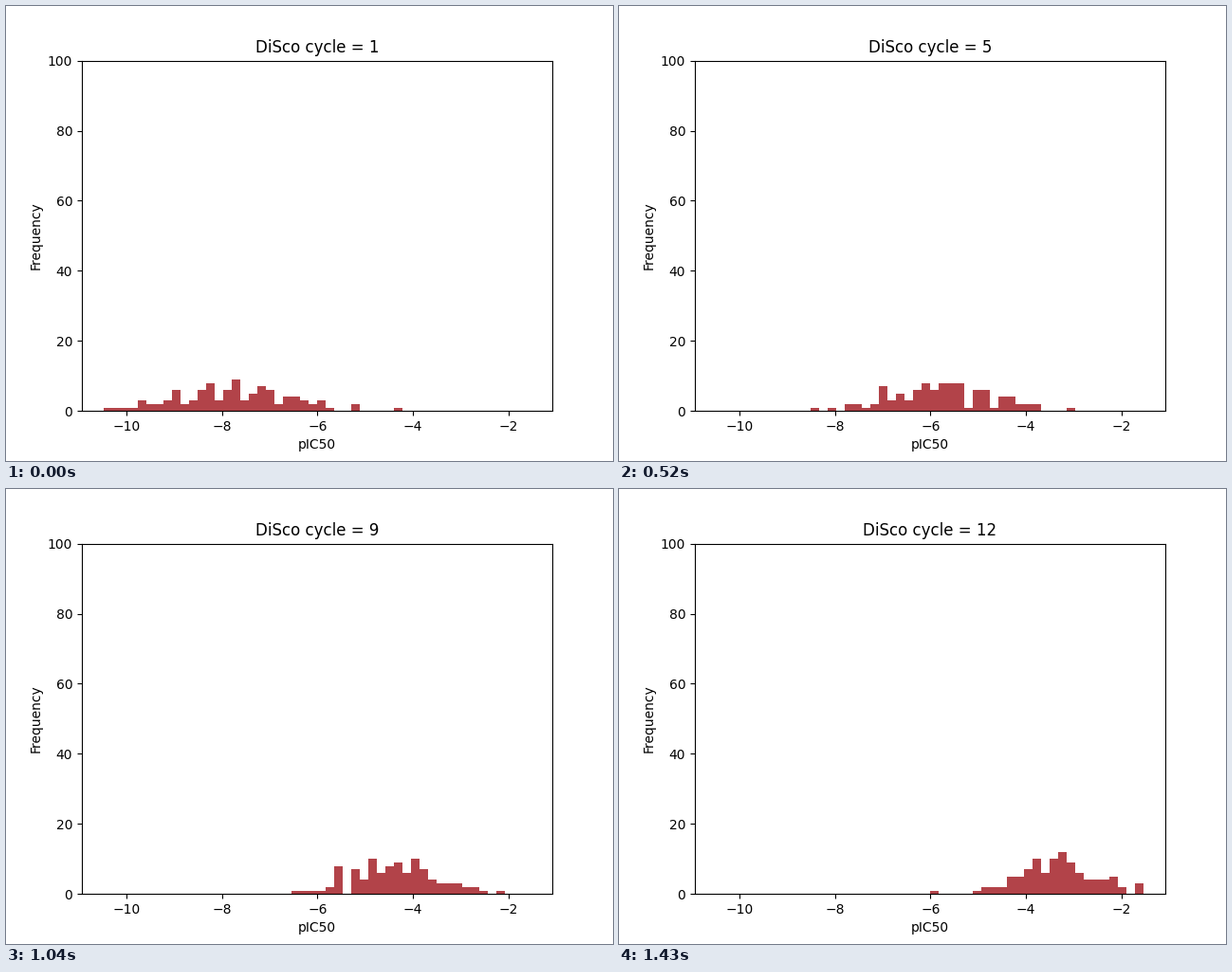
Recreate the animation shown at these times as a matplotlib script. Size 640 px wide and 480 px high, loop 1.56 s.

```python
import numpy as np
import matplotlib.pyplot as plt
from matplotlib.animation import FuncAnimation

BINS = 50
CYCLES = 12
SAMPLES = 100
LOW, HIGH = -10.487, -1.532
BAR_COLOR = "#b24349"

edges = np.linspace(LOW, HIGH, BINS + 1)


def normal_quantile(u):
    """Tukey lambda approximation of the inverse normal distribution."""
    return (u ** 0.14 - (1 - u) ** 0.14) / 0.1975


def histogram(cycle):
    """Bell-shaped sample whose centre climbs and narrows with each cycle."""
    rng = np.random.default_rng(cycle)
    center = np.interp(cycle, [1, 3, 7, CYCLES], [-7.75, -6.5, -5.08, -3.35])
    spread = np.interp(cycle, [1, CYCLES], [1.15, 0.75])
    u = (np.arange(SAMPLES) + rng.random(SAMPLES)) / SAMPLES
    jitter = rng.normal(0, 0.15, SAMPLES)
    values = center + spread * normal_quantile(u) + jitter
    return np.histogram(np.clip(values, LOW, HIGH), edges)[0]


fig, ax = plt.subplots(figsize=(6.4, 4.8), dpi=100)
bars = ax.bar(edges[:-1], np.zeros(BINS), width=np.diff(edges),
              align="edge", color=BAR_COLOR)
margin = 0.05 * (HIGH - LOW)
ax.set_xlim(LOW - margin, HIGH + margin)
ax.set_ylim(0, 100)
ax.set_xlabel("pIC50")
ax.set_ylabel("Frequency")
title = ax.set_title("")


def update(frame):
    cycle = frame + 1
    for bar, count in zip(bars, histogram(cycle)):
        bar.set_height(count)
    title.set_text(f"DiSco cycle = {cycle}")
    return [*bars, title]


animation = FuncAnimation(fig, update, frames=CYCLES, interval=130,
                          repeat=True, repeat_delay=0)
plt.show()
```
